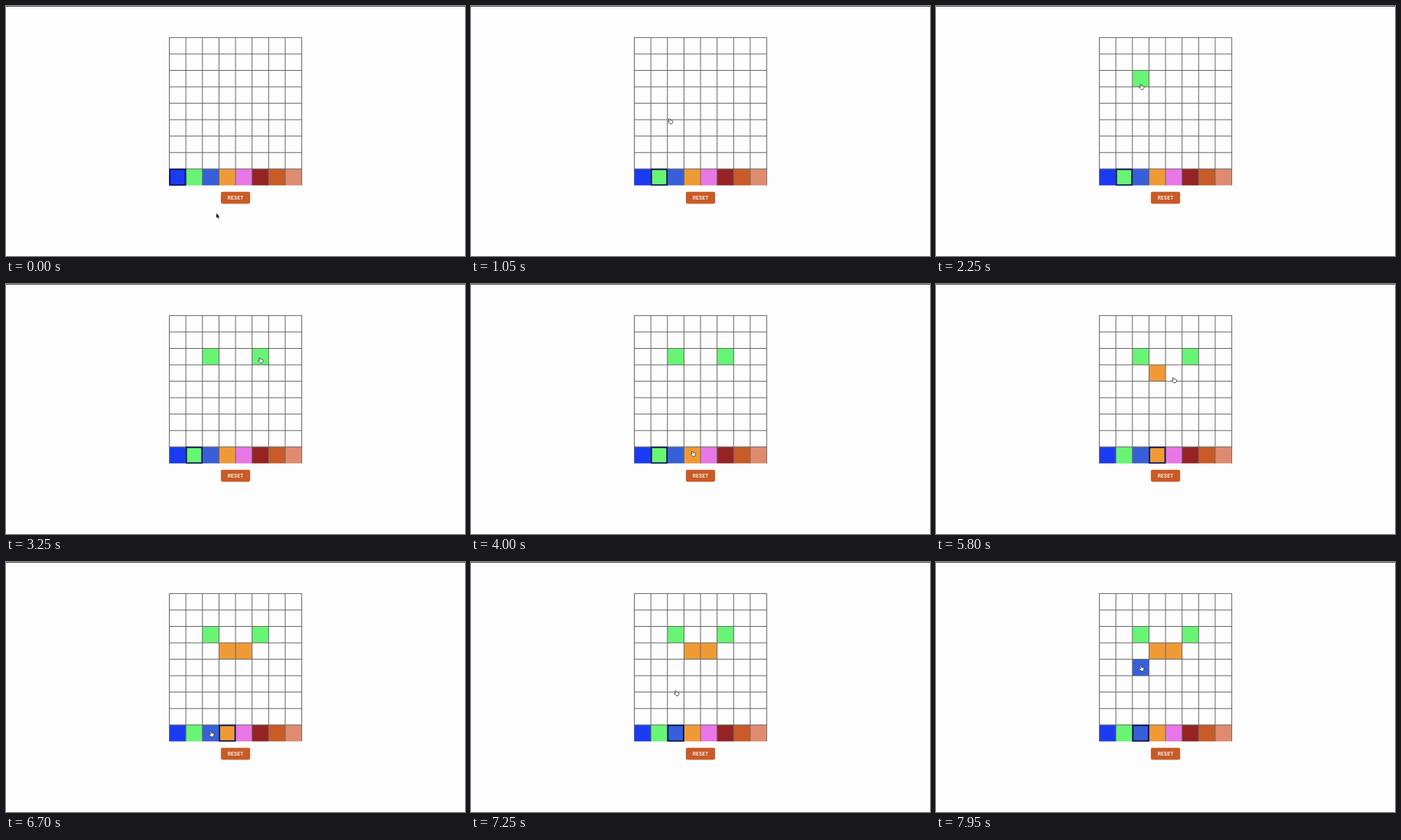
Animation, 600 px wide and 328 px high, one loop 8 s. Source, as an HTML page with a canvas:

```html
<!DOCTYPE html>
<html lang="en">
<head>
<meta charset="utf-8">
<title>Pixel painter</title>
<style>
  html, body { margin: 0; width: 100%; height: 100%; overflow: hidden; background: #fdfdfd; }
  canvas { display: block; }
</style>
</head>
<body>
<canvas id="stage" width="600" height="328"></canvas>
<script>
const ctx = document.getElementById('stage').getContext('2d');
const LOOP = 8000, MOVE = 600, SIZE = 8;
const palette = ['#1a3bf3', '#68f575', '#385fda', '#f09a36', '#e876e6', '#962323', '#c85b27', '#e08b70'];

const gridX = col => 213.5 + 21.64 * col;
const gridY = row => 41.4 + 21.55 * row;

// Clicks in grid units: a click in the bottom row picks a colour, one above it paints a cell.
const clicks = [
  { at: 50, col: 2.84, row: 10.7 },
  { at: 700, col: 1.5, row: 8.4 },
  { at: 2250, col: 2.5, row: 2.85 },
  { at: 3200, col: 5.5, row: 2.45 },
  { at: 4150, col: 3.5, row: 8.25 },
  { at: 5300, col: 3.5, row: 3.45 },
  { at: 6100, col: 4.55, row: 3.8 },
  { at: 6900, col: 2.5, row: 8.4 },
  { at: 7850, col: 2.5, row: 4.4 }
];

// After each click the cursor glides to the place of the next one.
function cursorAt(t) {
  const next = clicks.findIndex(c => c.at > t);
  if (next < 1) return clicks.at(next);
  const from = clicks[next - 1], to = clicks[next];
  const u = Math.min(1, (t - from.at) / MOVE), ease = u * u * (3 - 2 * u);
  return {
    col: from.col + (to.col - from.col) * ease,
    row: from.row + (to.row - from.row) * ease
  };
}

function fillCell(col, row, color) {
  ctx.fillStyle = color;
  ctx.fillRect(gridX(col), gridY(row), gridX(1) - gridX(0), gridY(1) - gridY(0));
}

const arrow = new Path2D('M0 0V6L1.4 4.8L2.4 7L3.4 6.6L2.5 4.4H4.2Z');
const hand = new Path2D('M-.9 .3Q-.2 -.5 .5 .4L1.2 2.1L3.3 2.3Q4.4 2.6 4.4 3.6L4 5.4L3.2 6.8H.4L-2 4.3Q-2.2 3.2 -1.2 3.4L-.2 3.9Z');

function drawCursor({ col, row }) {
  const onCells = row < SIZE + 1;
  ctx.save();
  ctx.translate(gridX(col), gridY(row));
  ctx.fillStyle = onCells ? '#fff' : '#111';
  ctx.fill(onCells ? hand : arrow);
  if (onCells) {
    ctx.strokeStyle = '#333';
    ctx.lineWidth = 0.8;
    ctx.stroke(hand);
  }
  ctx.restore();
}

function drawButton() {
  ctx.fillStyle = '#c85b27';
  ctx.beginPath();
  ctx.roundRect(280.9, 243.7, 38.2, 15.7, 1.8);
  ctx.fill();
  ctx.fillStyle = '#fff';
  ctx.font = '500 6.6px Roboto, sans-serif';
  ctx.letterSpacing = '0.2px';
  ctx.textAlign = 'center';
  ctx.fillText('RESET', 300.1, 254.2);
}

function drawGrid() {
  ctx.beginPath();
  for (let i = 0; i <= SIZE; i++) {
    ctx.moveTo(gridX(i), gridY(0));
    ctx.lineTo(gridX(i), gridY(SIZE + 1));
    ctx.moveTo(gridX(0) - 0.5, gridY(i));
    ctx.lineTo(gridX(SIZE) + 0.5, gridY(i));
  }
  ctx.strokeStyle = '#686868';
  ctx.lineWidth = 1;
  ctx.stroke();
}

function drawSelection(col) {
  ctx.strokeStyle = '#0a1155';
  ctx.lineWidth = 1.7;
  ctx.strokeRect(gridX(col) + 0.6, gridY(SIZE) + 0.6, gridX(1) - gridX(0) - 1.2, gridY(1) - gridY(0) - 1.2);
}

function draw(t) {
  ctx.fillStyle = '#fdfdfd';
  ctx.fillRect(0, 0, 600, 328);
  ctx.fillStyle = '#555';
  ctx.fillRect(0, 0, 600, 1);

  let selected = 0;
  for (const { at, col, row } of clicks) {
    if (at > t) break;
    const [c, r] = [Math.floor(col), Math.floor(row)];
    if (r === SIZE) selected = c;
    else if (r < SIZE) fillCell(c, r, palette[selected]);
  }
  palette.forEach((color, col) => fillCell(col, SIZE, color));
  drawGrid();
  drawSelection(selected);
  drawButton();
  drawCursor(cursorAt(t));
}

const start = performance.now();
function frame() {
  const t = (performance.now() - start) % LOOP;
  draw(Math.floor(t / 50) * 50);
  requestAnimationFrame(frame);
}
frame();
</script>
</body>
</html>
```
